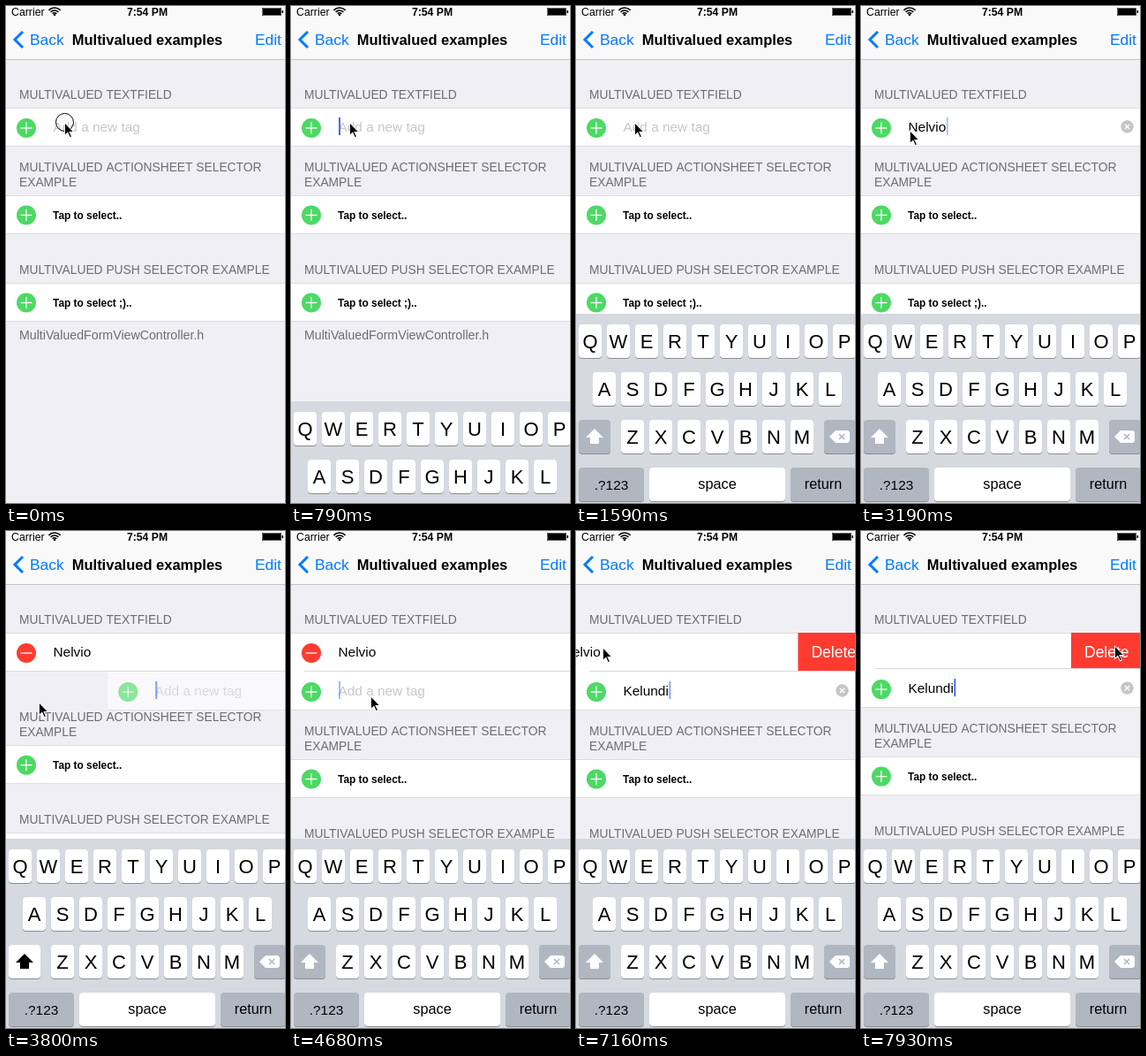
Recreate the animation shown at these times as an HTML page with a canvas. Size 316x562 px, loop 8 s.

```html
<!DOCTYPE html>
<html lang="en">
<head>
<meta charset="utf-8">
<title>Multivalued examples</title>
<style>
  html, body { margin: 0; width: 100%; height: 100%; overflow: hidden; background: #efeff4; }
  canvas { display: block; }
</style>
</head>
<body>
<canvas id="stage" width="316" height="562"></canvas>
<script>
const c = document.getElementById('stage').getContext('2d');
const LOOP = 8000, STEP = 88.1;
const BLUE = '#007aff', GREEN = '#4cd964', RED = '#ff3b30', LINE = '#dbdbdf', HEAD = '#6d6d72';

const FIRST = 'Nelvio', FIRST_KEYS = [1670, 1670, 1850, 2030, 2110, 2200];
const SECOND = 'Kelundi', SECOND_KEYS = [4840, 4930, 5110, 5200, 5290, 5370, 5460];
const CARET_RESETS = [700, ...FIRST_KEYS, 3690, ...SECOND_KEYS];
const TAPS = [[0, 80], [610, 700], [6870, 6960], [7750, 7840]];

// time, x, y of the mouse pointer
const PATH = [
  [0, 66, 131], [2680, 66, 131], [3185, 55, 140], [3540, 27, 140], [3620, 28, 148],
  [3800, 37, 193], [4100, 70, 191], [4400, 90, 186], [6010, 90, 186], [6090, 91, 181],
  [6450, 62, 158], [6800, 30, 131], [7150, 30, 131], [7420, 145, 172], [7680, 287, 129], [LOOP, 287, 129]
];

const clamp = v => Math.max(0, Math.min(1, v));
const smooth = v => (v = clamp(v)) * v * (3 - 2 * v);
const spring = (ms, w) => { const x = Math.max(0, ms) / 1000 * w; return 1 - (1 + x) * Math.exp(-x); };
const typed = (word, keys, t) => word.slice(0, keys.filter(k => t >= k).length);

function rect(x, y, w, h, fill) {
  c.fillStyle = fill;
  c.fillRect(x, y, w, h);
}

function text(s, x, y, size, fill = '#000', weight = '', align = 'left') {
  c.font = `${weight} ${size}px "Liberation Sans", Arial, sans-serif`;
  c.textAlign = align;
  c.fillStyle = fill;
  c.fillText(s, x, y);
}

function poly(points, fill) {
  c.beginPath();
  points.forEach(p => c.lineTo(...p));
  c.closePath();
  c.fillStyle = fill;
  c.fill();
}

function stroke(points, color, width) {
  c.beginPath();
  points.forEach((p, i) => i ? c.lineTo(...p) : c.moveTo(...p));
  c.strokeStyle = color;
  c.lineWidth = width;
  c.stroke();
}

function disc(x, y, r, fill) {
  c.beginPath();
  c.arc(x, y, r, 0, 7);
  c.fillStyle = fill;
  c.fill();
}

function cross(x, y, r, color, width) {
  stroke([[x - r, y - r], [x + r, y + r]], color, width);
  stroke([[x - r, y + r], [x + r, y - r]], color, width);
}

function icon(y, add) {
  disc(23, y, 11, add ? GREEN : RED);
  stroke([[16.5, y], [29.5, y]], '#fff', 1.3);
  if (add) stroke([[23, y - 6.5], [23, y + 6.5]], '#fff', 1.3);
}

function row(y) {
  rect(0, y, 320, 44, '#fff');
  rect(0, y, 320, 1, LINE);
  rect(0, y + 43, 320, 1, LINE);
}

function caretAlpha(t) {
  const last = Math.max(...CARET_RESETS.filter(s => s <= t));
  const e = (t - last) % 1070, again = t - last >= 1070;
  if (e < 560) return 1;
  if (e < 700) return 1 - (e - 560) / 140;
  return clamp((e - 920) / 150);
}

// text field whose row starts at y
function field(value, y, t, active) {
  if (value) text(value, 53.5, y + 26.5, 15.4);
  else text('Add a new tag', 53.5, y + 26.5, 15.4, '#c7c7cc');
  if (!active) return;
  if (value) {
    disc(301.5, y + 21.5, 7.2, '#c5c5c9');
    cross(301.5, y + 21.5, 2.6, '#fff', 1.4);
  }
  const w = value ? c.measureText(value).width : 0;
  const alpha = c.globalAlpha;
  c.globalAlpha = alpha * caretAlpha(t);
  rect(54 + w, y + 11, 2, 20, '#426bf2');
  c.globalAlpha = alpha;
}

function selector(y, label) {
  row(y);
  icon(y + 22.5, true);
  text(label, 53, y + 26.5, 11.9, '#000', 'bold');
}

function table(t) {
  const ins = smooth((t - 3620) / 300), del = smooth((t - 7892) / 300);
  const slide = 82 * spring(t - 6960, 17.5);
  const shift = 44 * (ins - del);

  // first tag
  c.save();
  c.beginPath();
  c.rect(0, 115, 316, 44 * (1 - del));
  c.clip();
  row(115);
  if (t < 7840) {
    c.save();
    c.translate(-slide, 0);
    icon(138, ins === 0);
    field(typed(FIRST, FIRST_KEYS, t), 115, t, t >= 700 && ins === 0);
    c.restore();
  }
  if (slide) {
    rect(320 - slide, 115, slide, 43, RED);
    text('Delete', 335 - slide, 143, 17.5, '#fff');
  }
  c.restore();

  // second tag
  if (ins) {
    c.save();
    c.translate(320 * (1 - ins), -44 * del);
    c.globalAlpha = ins;
    rect(0, 159, 320, 43, '#fff');
    rect(0, 202, 320, 1, LINE);
    if (ins === 1) {
      rect(0, 158, 15, 1, '#fff');
      rect(15, 158, 305, 1, LINE);
    }
    icon(182, true);
    field(typed(SECOND, SECOND_KEYS, t), 159, t, true);
    c.restore();
  }

  text('MULTIVALUED TEXTFIELD', 15, 105, 13.8, HEAD);
  c.save();
  c.translate(0, shift);
  text('MULTIVALUED ACTIONSHEET SELECTOR', 15, 187, 13.8, HEAD);
  text('EXAMPLE', 15, 203.5, 13.8, HEAD);
  selector(214, 'Tap to select..');
  text('MULTIVALUED PUSH SELECTOR EXAMPLE', 15, 303, 13.8, HEAD);
  selector(313, 'Tap to select ;)..');
  text('MultiValuedFormViewController.h', 15, 377, 14.2, HEAD);
  c.restore();
}

function bars() {
  rect(0, 0, 316, 60, '#f9f9f9');
  rect(0, 60, 316, 1, '#c4c4c7');
  text('Carrier', 6, 10.5, 12.3);
  text('7:54 PM', 160, 10.5, 12.2, '#000', 'bold', 'center');
  for (const r of [3.2, 6, 9]) {
    c.beginPath();
    c.arc(55, 11, r, -Math.PI * .76, -Math.PI * .24);
    c.strokeStyle = '#000';
    c.lineWidth = 1.6;
    c.stroke();
  }
  disc(55, 10, 1.3, '#000');
  c.strokeStyle = '#000';
  c.lineWidth = .6;
  c.strokeRect(290.3, 2.3, 21.4, 8.4);
  rect(291, 3, 20, 7, '#000');
  rect(312.5, 5, 1.5, 3, '#000');
  stroke([[19, 29], [10, 38], [19, 47]], BLUE, 3);
  text('Back', 27, 44, 17.4, BLUE);
  text('Multivalued examples', 160, 44, 16.5, '#000', 'bold', 'center');
  text('Edit', 282, 44, 17.3, BLUE);
}

function key(x, y, w, fill = '#fff') {
  for (const [dy, f] of [[1, '#8b8d92'], [0, fill]]) {
    c.beginPath();
    c.roundRect(x, y + dy, w, 38, 4);
    c.fillStyle = f;
    c.fill();
  }
}

function keyboard(t) {
  const up = spring(t - 700, 17.5);
  if (!up) return;
  const GREY = '#b1b7c1';
  const shifted = t < 1490 || (t >= 3610 && t < 4670);
  c.save();
  c.translate(0, Math.round(562 - 214 * up));
  rect(0, 0, 316, 214, '#d6d9df');
  [['QWERTYUIOP', 3], ['ASDFGHJKL', 19], ['ZXCVBNM', 51]].forEach(([letters, x0], r) => {
    [...letters].forEach((ch, i) => {
      const x = x0 + 32 * i, y = 12 + 54 * r;
      key(x, y, 26);
      text(ch, x + 13, y + 27, 22, '#000', '', 'center');
    });
  });
  key(3, 120, 36, shifted ? '#fff' : GREY);
  poly([[21, 130], [31, 140], [26, 140], [26, 147], [16, 147], [16, 140], [11, 140]], shifted ? '#000' : '#fff');
  key(281, 120, 36, GREY);
  poly([[287, 139], [294, 132], [308, 132], [310, 134], [310, 144], [308, 146], [294, 146]], '#fff');
  cross(301, 139, 3, GREY, 1.6);
  key(3, 174, 74, GREY);
  text('.?123', 40, 199, 15.4, '#000', '', 'center');
  key(83, 174, 154);
  text('space', 160, 198, 16.3, '#000', '', 'center');
  key(243, 174, 74, GREY);
  text('return', 280, 198, 16.2, '#000', '', 'center');
  c.restore();
}

function pointer(t) {
  const i = PATH.findIndex(p => p[0] > t);
  const [t0, x0, y0] = PATH[i - 1], [t1, x1, y1] = PATH[i];
  const u = (t - t0) / (t1 - t0);
  const x = Math.round(x0 + (x1 - x0) * u), y = Math.round(y0 + (y1 - y0) * u);
  if (TAPS.some(([a, b]) => t >= a && t < b)) {
    c.beginPath();
    c.arc(x + .5, y + .5, 10, 0, 7);
    c.strokeStyle = '#000';
    c.lineWidth = 1;
    c.stroke();
  }
  c.save();
  c.translate(x, y);
  poly([[0, 0], [0, 16.5], [3.7, 13.2], [6.3, 18.5], [9, 17.2], [6.6, 12], [11.5, 12]], '#fff');
  poly([[.9, 2], [.9, 14.2], [4, 11.5], [6.7, 17.2], [7.9, 16.6], [5.2, 11], [9.6, 11]], '#000');
  c.restore();
}

function frame() {
  const now = performance.now() % LOOP;
  const n = Math.floor((now + 10) / STEP);
  const t = n ? n * STEP + 10 : 0;
  rect(0, 0, 316, 562, '#efeff4');
  table(t);
  bars();
  keyboard(t);
  pointer(Math.min(t, LOOP - 1));
  requestAnimationFrame(frame);
}
frame();
</script>
</body>
</html>
```
